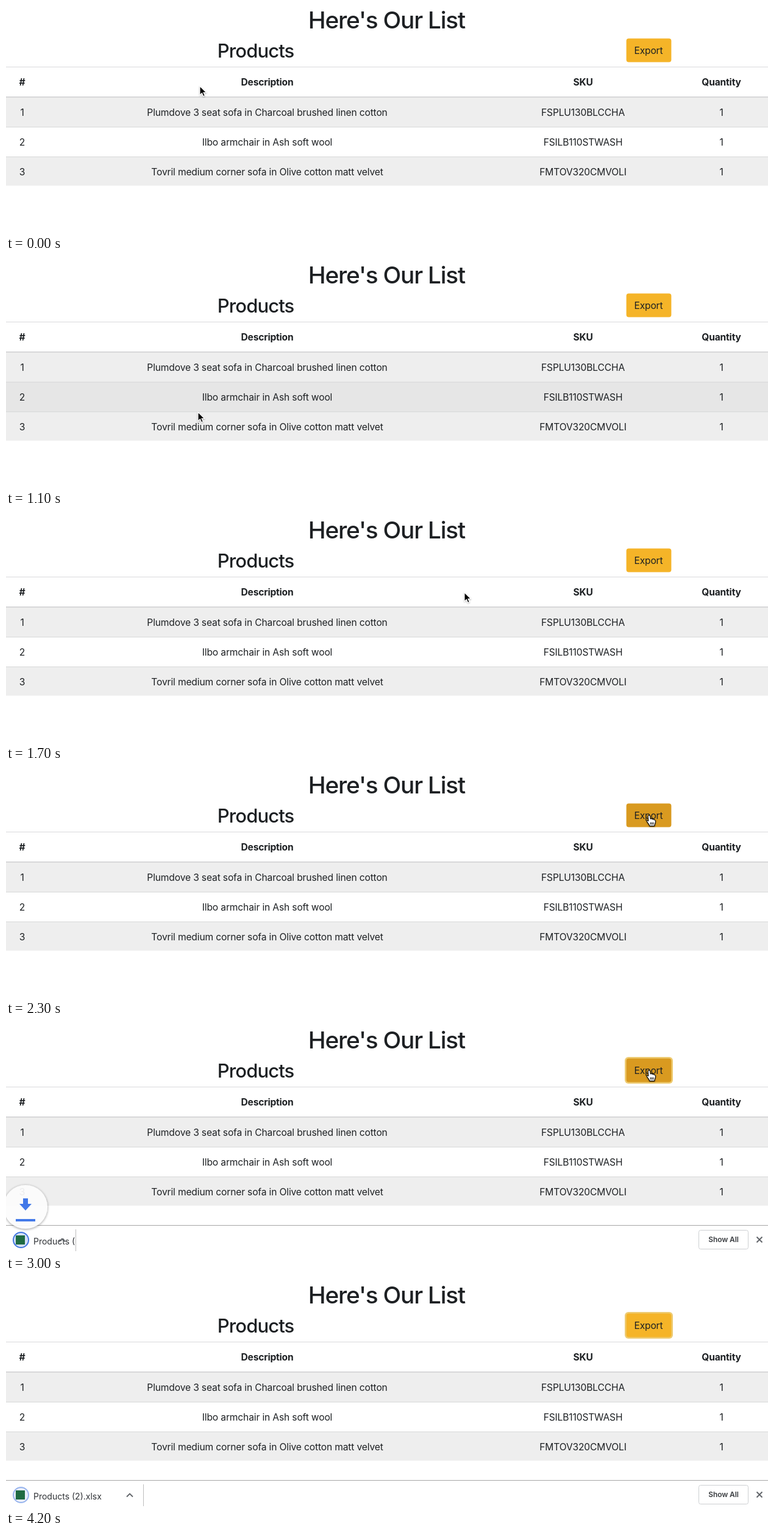
Write an HTML page that moves like this. It is 1250 px wide and 374 px high and loops after 4.3 s.

```html
<!DOCTYPE html>
<html lang="en">
<head>
<meta charset="utf-8">
<title>Product export</title>
<style>
  html, body { margin: 0; width: 100%; height: 100%; overflow: hidden; background: #fff; }
  svg { display: block; width: 1250px; height: 374px; }
  text {
    font: 400 15.6px Inter, sans-serif;
    font-optical-sizing: none;
    letter-spacing: -.15px;
    text-anchor: middle;
    fill: #1d2023;
  }
  .title { font-size: 38.75px; font-weight: 500; letter-spacing: -1.2px; }
  .sub { font-size: 31px; font-weight: 500; letter-spacing: -.9px; }
  .head { font-weight: 700; letter-spacing: -.2px; }
  .file { font-size: 14px; letter-spacing: 0; text-anchor: start; fill: #2f3236; }
  .small { font-size: 12px; font-weight: 600; letter-spacing: -.1px; fill: #3a3d41; }
  .line { fill: none; stroke: #5f6368; stroke-width: 1.8; }
</style>
</head>
<body>
<svg viewBox="0 0 1250 374">
  <defs>
    <clipPath id="itemClip"><rect id="itemBox" y="329" width="225" height="45"/></clipPath>
    <filter id="soft" x="-30%" y="-30%" width="160%" height="160%">
      <feDropShadow dx="0" dy="1" stdDeviation="2" flood-opacity=".45"/>
    </filter>
    <filter id="faint" x="-40%" y="-30%" width="180%" height="180%">
      <feDropShadow dx="0" dy="1" stdDeviation=".8" flood-opacity=".35"/>
    </filter>
  </defs>

  <rect width="1250" height="374" fill="#fff"/>
  <text class="title" x="624.4" y="37">Here's Our List</text>
  <text class="sub" x="409.6" y="85">Products</text>

  <rect id="focus" x="1015" y="51" width="79" height="44" rx="6" fill="#eecb72"/>
  <rect id="button" x="1017.6" y="53.6" width="73.8" height="38.8" rx="4"/>
  <text x="1054" y="79">Export</text>

  <g id="table"></g>

  <g id="shelf">
    <rect y="328" width="1250" height="60" fill="#fff"/>
    <rect y="328" width="1250" height="1" fill="#a6a6a6"/>
    <g clip-path="url(#itemClip)">
      <circle id="ring" cx="24.5" cy="352.5" r="12.5" fill="#d3dff8" stroke="#3f74e0" stroke-width="2"/>
      <rect x="16" y="345" width="15" height="15" fill="#1f6b43"/>
      <text class="file" x="45" y="360">Products (2).xlsx</text>
    </g>
    <g id="itemEnd">
      <path class="line" d="M-27 355.5l5-5 5 5"/>
      <rect y="335" width="1" height="36" fill="#bdbdbd"/>
    </g>
    <rect x="1136.5" y="336.5" width="81" height="31" rx="3" fill="#fff" stroke="#cdcfd2"/>
    <text class="small" x="1177" y="356">Show All</text>
    <path class="line" d="M1231.5 347.5l9 9m0-9l-9 9"/>
  </g>

  <g id="badge">
    <circle r="36" fill="#fcfcfc" filter="url(#soft)"/>
    <path d="M-4-14h8v9h6L0 6-10-5h6zM-16 20h32v4h-32z" fill="#3670e8"/>
  </g>

  <path id="arrow" d="M0 0V14.6L3.4 11.5 5.7 16.8 8.3 15.7 6 10.5H10.6Z"
        fill="#000" stroke="#fff" stroke-width="1.1" filter="url(#faint)"/>
  <path id="hand" d="M-1.9 1.6C-1.9-.5 1.3-.6 1.6 1.5L2.2 6C3.4 5 4.9 5.3 5.2 6.5 6.4 5.8 7.8 6.3 8 7.6 9.4 7.2 10.6 8 10.6 9.5 10.7 12.5 9 14.2 8.8 17.6H.7C.3 15-1.8 13.1-3.6 10.4-4.6 8.7-2.8 7.6-1.2 9.3Z M2.3 11.5v4M4.6 11.5v4M6.9 11.5v4"
        fill="#fff" stroke="#000" stroke-width="1.1" stroke-linejoin="round" filter="url(#faint)"/>
</svg>
<script>
const $ = id => document.getElementById(id);
const LOOP = 4300, STEP = 100;
const CLICK = 2500, SHELF_IN = 2800, ITEM_IN = 2888, PULSE_IN = 2960, POINTER_OUT = 3700;
const ROW_TOP = 150, ROW_HEIGHT = 49, ITEM_WIDTH = 225;

const COLUMNS = [26.5, 428.5, 946.5, 1173.5];
const HEAD = ['#', 'Description', 'SKU', 'Quantity'];
const ROWS = [
  ['1', 'Plumdove 3 seat sofa in Charcoal brushed linen cotton', 'FSPLU130BLCCHA', '1'],
  ['2', 'Ilbo armchair in Ash soft wool', 'FSILB110STWASH', '1'],
  ['3', 'Tovril medium corner sofa in Olive cotton matt velvet', 'FMTOV320CMVOLI', '1']
];

// Where the pointer rests or turns: time, x, y
const PATH = [
  [0, 318, 132], [700, 318, 132], [1100, 315, 249], [1200, 405, 142],
  [1700, 752, 126], [2200, 1055, 73], [3000, 1055, 73], [3600, 1005, 105]
];

function pointerAt(t) {
  const i = PATH.findIndex(key => key[0] > t);
  if (i < 0) return PATH[PATH.length - 1].slice(1);
  const [t0, x0, y0] = PATH[i - 1], [t1, x1, y1] = PATH[i];
  const p = (t - t0) / (t1 - t0);
  return [x0 + (x1 - x0) * p, y0 + (y1 - y0) * p];
}

function add(tag, attrs, label = '') {
  const el = document.createElementNS('http://www.w3.org/2000/svg', tag);
  for (const name in attrs) el.setAttribute(name, attrs[name]);
  el.textContent = label;
  return $('table').appendChild(el);
}

const rule = (y, height, fill) => add('rect', { y, width: 1250, height, fill });
const cells = (labels, y, cls) =>
  labels.forEach((label, i) => add('text', { x: COLUMNS[i], y, class: cls }, label));

rule(100, 1, '#d9dadb');
cells(HEAD, 131, 'head');
const bands = ROWS.map((row, i) => {
  const top = ROW_TOP + ROW_HEIGHT * i;
  const band = rule(top, ROW_HEIGHT - (i === 2 ? 1 : 0), '#fff');
  rule(i ? top : top - 1, i ? 1 : 2, '#d7d8d9');
  cells(row, top + 31, 'cell');
  return band;
});

const set = (id, name, value) => $(id).setAttribute(name, value);
const show = (id, on) => $(id).style.display = on ? '' : 'none';
const move = (id, x, y) => set(id, 'transform', `translate(${x} ${y})`);

function drawPage(t) {
  const [x, y] = pointerAt(t);
  const present = t < POINTER_OUT;
  const over = present && Math.abs(x - 1054) < 37 && Math.abs(y - 73) < 20;
  show('arrow', present && !over);
  show('hand', over);
  move(over ? 'hand' : 'arrow', x, y);

  set('button', 'fill', over ? '#d99a20' : '#f5b428');
  show('focus', t >= CLICK);
  const hovered = present ? Math.floor((y - ROW_TOP - 2) / ROW_HEIGHT) : -1;
  bands.forEach((band, i) =>
    band.setAttribute('fill', i === hovered ? '#e6e6e6' : i % 2 ? '#fff' : '#eee'));
}

function drawShelf(t) {
  const age = t - SHELF_IN;
  show('shelf', age >= 0);
  move('shelf', 0, Math.max(0, 24 - age * .24));

  const growth = 1 - Math.exp(Math.min(0, ITEM_IN - t) / 159);
  const width = Math.round(ITEM_WIDTH * growth);
  set('itemBox', 'width', width + 1);
  show('itemEnd', width > 0);
  move('itemEnd', width, 0);

  const pulse = Math.max(0, t - PULSE_IN) / 1000;
  set('ring', 'opacity', .5 + .5 * Math.cos(2 * Math.PI * pulse));

  const fall = age / 400;
  show('badge', fall > 0 && fall < 1);
  move('badge', 32, 270 + 56 * fall);
  set('badge', 'opacity', .93 * Math.sin(Math.PI * fall));
}

const start = performance.now();
function tick(now) {
  const elapsed = Math.max(0, now - start) % LOOP;
  const t = Math.floor(elapsed / STEP) * STEP;
  drawPage(t);
  drawShelf(t);
  requestAnimationFrame(tick);
}
tick(start);
</script>
</body>
</html>
```
